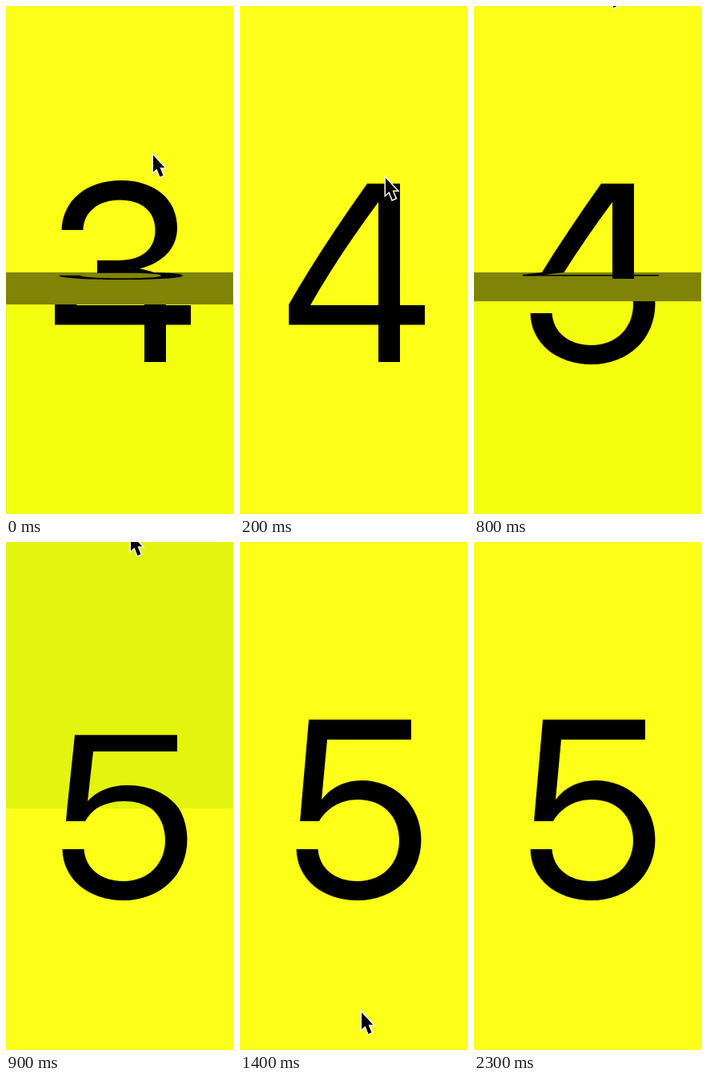
Write an HTML page with a canvas that moves like this. It is 285 by 635 pixels and loops after 2400 ms.

```html
<!DOCTYPE html>
<html lang="en">
<head>
<meta charset="utf-8">
<title>Flip counter</title>
<style>
  html, body { margin: 0; width: 100%; height: 100%; overflow: hidden; background: #fff; }
  canvas { display: block; }
</style>
</head>
<body>
<canvas id="stage" width="284" height="635" role="img" aria-label="Flip counter: 3, 4, 5"></canvas>
<script>
const W = 284, H = 635, HINGE = 333, PANEL = 515;
const LOOP = 2400, STEP = 100, FLIP = 440;
const YELLOW = '#fdff18', SHADED = '#f4ff10';
const ctx = document.getElementById('stage').getContext('2d');

const digits = {
  3: new Path2D(`M69.5 280C71 243 100 218 144 218C185 218 214 241 214 277C214 301 199 320 167 328.5
    C202 334 221 354 221 383C221 423 190 449 143 449C98 449 67 422 66 381H93C94 408 114 425 143 425
    C174 425 194 409 194 383C194 357 174 342 142 342H114V318H140C170 318 186.5 304 186.5 280
    C186.5 257 170 242.5 142 242.5C116 242.5 97 257 96.5 280Z`),
  4: new Path2D(`M159 222H200V374H231V398.5H200V445H173V398.5H61V373Q100 305 159 222Z
    M173 245Q120 317 88 374H173Z`),
  5: new Path2D(`M86 222H214V247H109L102 322C114 306 132 298 152 298C194 298 226.5 329 226.5 372
    C226.5 416 193 448 147 448C103 448 71 421 70.5 384H97.5C99 408 119 424 147 424
    C177 424 199 403 199 373C199 342 178 322 147 322C126 322 108 333 99 349H75Z`)
};
const arrow = new Path2D('M0 0V21L4.5 17 8.5 27 12.5 25.3 8.5 15.5H14.3Z');

// Start times of the two flips
const flips = [{ start: -213, from: 3, to: 4 }, { start: 586.3, from: 4, to: 5 }];

// Pointer tip at each step
const pointer = [
  [184, 186.5], [184, 186.5], [182, 215], [175, 300], [168.5, 375], [167.5, 405], [167.5, 402],
  [167, 220], [166, -25], [156, -10], [152, 69], [152, 264], [152, 460], [152, 545],
  [152, 588], [152, 608], [152, 618], [152, 624], [152, 624]
];

function half(digit, isTop, color, scale = 1) {
  ctx.save();
  ctx.translate(0, HINGE);
  ctx.scale(1, scale);
  ctx.beginPath();
  ctx.rect(0, isTop ? -PANEL : 0, W, PANEL);
  ctx.clip();
  ctx.fillStyle = color;
  ctx.fillRect(0, -PANEL, W, 2 * PANEL);
  ctx.translate(0, -HINGE);
  ctx.fillStyle = '#000';
  ctx.fill(digits[digit], 'evenodd');
  ctx.restore();
}

const dim = (amount, r, g, b) =>
  `rgb(${254 * (1 - r * amount)}, ${255 * (1 - g * amount)}, ${26 * (1 - b * amount)})`;

function drawFlip({ from, to }, progress) {
  const turn = Math.cos(Math.PI * (1 - Math.cos(Math.PI * progress)) / 2);
  const scale = Math.abs(turn), dark = 1 - scale;
  half(from, true, YELLOW);
  if (turn > 0) {
    half(to, false, SHADED);
    half(from, false, dim(dark, .54, .52, .75), scale);
  } else {
    half(to, false, YELLOW);
    half(to, true, dim(dark, .61, .24, 2.5), scale);
  }
}

function drawPointer([x, y]) {
  ctx.save();
  ctx.translate(x, y);
  ctx.lineWidth = 3;
  ctx.strokeStyle = '#fff';
  ctx.stroke(arrow);
  ctx.fillStyle = '#000';
  ctx.fill(arrow);
  ctx.restore();
}

function draw(time) {
  const step = Math.floor(time % LOOP / STEP), now = step * STEP;
  const flip = flips[now < flips[1].start ? 0 : 1];
  const progress = (now - flip.start) / FLIP;
  if (progress < 1) {
    drawFlip(flip, progress);
  } else {
    ctx.fillStyle = YELLOW;
    ctx.fillRect(0, 0, W, H);
    ctx.fillStyle = '#000';
    ctx.fill(digits[flip.to], 'evenodd');
  }
  if (pointer[step]) drawPointer(pointer[step]);
}

const begin = performance.now();
function tick() {
  draw(performance.now() - begin);
  requestAnimationFrame(tick);
}
tick();
</script>
</body>
</html>
```
